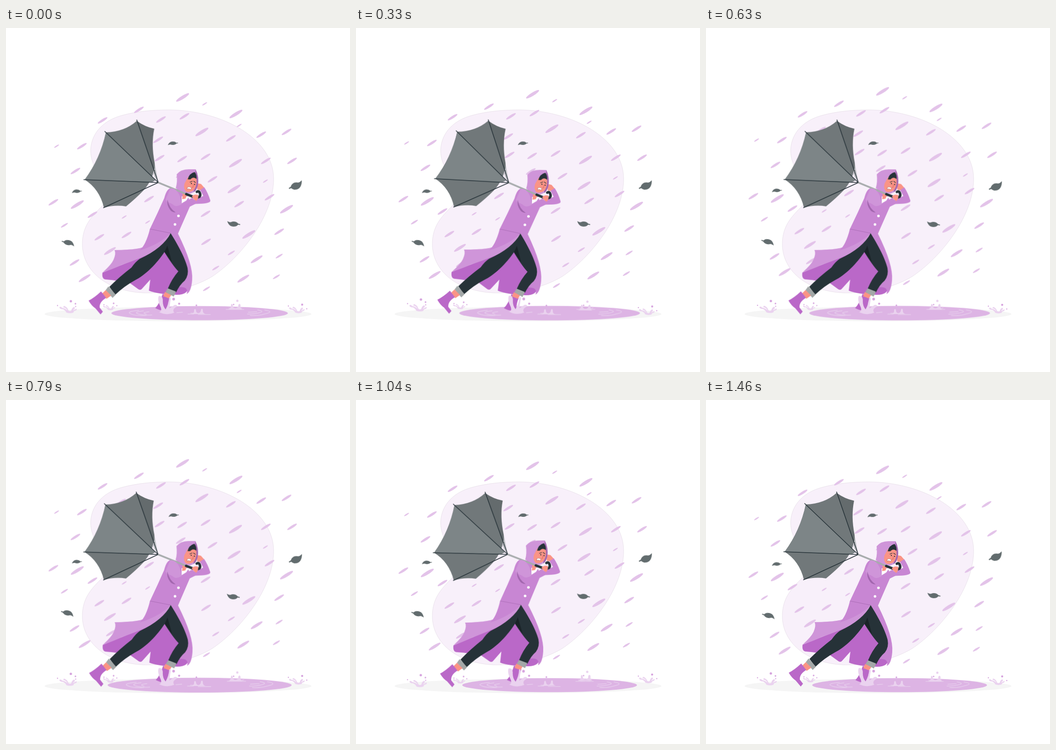
Write an HTML page without scripts that moves like this. It is 748 px wide and 748 px high and loops after 1.5 s.

```html
<!DOCTYPE html>
<html lang="en">
<head>
<meta charset="utf-8">
<title>Walking against the storm</title>
<style>
  html, body { margin: 0; width: 100%; height: 100%; overflow: hidden; background: #fff; }
  svg { display: block; width: 100vw; height: 100vh; }

  .rain, .walker, .splashes { animation: 1.5s linear -40ms infinite; }
  .rain { animation-name: bob; }
  .walker, .splashes { animation-name: sway; }
  .walker { transform-origin: 307px 412px; }
  .splashes { transform-origin: 383px 606px; }
  .leaves { transform-origin: 383px 360px; animation: drift 1.5s linear infinite; }
  .puddle { transform-origin: 421px 620px; animation: swell 1.5s linear infinite; }

  @keyframes bob { 50% { transform: translateY(-15px); } }
  @keyframes sway {
    25% { transform: rotate(1deg); }
    75% { transform: rotate(-1deg); }
  }
  @keyframes drift {
    0%, 22% { transform: rotate(.45deg); }
    42% { transform: rotate(.9deg); }
    52.7% { transform: rotate(1.3deg); }
    69.3% { transform: rotate(.9deg); }
    83.3% { transform: rotate(.45deg); }
    97.3% { transform: rotate(0deg); }
    100% { transform: rotate(.45deg); }
  }
  @keyframes swell {
    0% { transform: scale(1.01); }
    22%, 42% { transform: scale(1.034); }
    52.7% { transform: scale(1.053); }
    69.3%, 97.3% { transform: scale(1); }
    100% { transform: scale(1.01); }
  }

  .rain polyline { fill: none; stroke: transparent; marker: url(#drop); }
  .coat { fill: #c886d3; }
  .fold { fill: #cf95d9; }
  .lining { fill: #ba68c8; }
  .shade { fill: #a266ae; }
  .dark { fill: #263238; }
  .skin { fill: #fa9486; }
  .cuff { fill: #a3a8a8; }
  .white { fill: #fff; }
  .line { fill: none; stroke: #263238; stroke-linecap: round; }
  .foam { fill: #ead2ef; }
  .bead { fill: #d6a4de; }
  .ripple { fill: none; stroke: #e6cbec; stroke-width: 1.7; stroke-linecap: round; }
  .leaves { fill: #626c6e; }
</style>
</head>
<body>
<svg viewBox="0 0 748 748">
  <defs>
    <marker id="drop" overflow="visible" markerWidth="1" markerHeight="1">
      <ellipse rx="1" ry=".22" transform="rotate(-32)" fill="#e3c3e9"/>
    </marker>
    <path id="leaf" d="M-14 5C-11-3-5-6 2-5C6-5 8-3 10-1.500L14-2L14.500-.5L10 .5C6 5-1 5-5 3.500C-9 2.500-11 4-14 5z"/>
    <path id="crown" d="M-8 7Q-9 3-15 0Q-22 0-23-4Q-20-7-17-3Q-10-2-5 3Q-8-3-14-4Q-15-7-12-7Q-6-5-3 3Q0 5 3 3Q4-3 9-5Q12-4 10-1Q7 1 7 3Q12-1 15-1Q15 3 11 3Q7 5 8 7Q0 10-8 7z"/>
  </defs>

  <path d="M355 178C470 179 582 240 582 328C582 410 510 499 449 540C405 567 345 577 300 576C215 572 166 525 166 470C166 430 186 410 209 387C226 366 216 345 203 320C190 300 184 285 184 265C186 225 215 200 252 190C285 181 320 178 355 178z"
    fill="#f8f0fa" stroke="#ddd3e0" stroke-width=".6"/>
  <ellipse cx="374" cy="622" rx="290" ry="15.500" fill="#f5f5f5"/>

  <g class="puddle">
    <ellipse cx="421" cy="620" rx="190" ry="15.300" fill="#ddb4e4"/>
    <path class="ripple" d="M290 614Q260 617 274 622Q284 626 306 625M300 615Q276 618 290 622Q300 625 318 624M312 617Q294 619 306 622M396 622H408M418 623H444M402 620H410M478 612H516M484 609Q500 615 512 609M546 613Q562 616 550 619Q540 622 524 622M561 613Q584 617 560 622Q548 626 530 625M526 618L544 617M372 619L384 618"/>
  </g>

  <g class="rain" transform="translate(0 .8)">
    <polyline stroke-width="16.500" points="384,151 500,187 426,226 499,294 496,350 528,449 610,394 155,384"/>
    <polyline stroke-width="15" points="226,485 545,503 516,545 171,544"/>
    <polyline stroke-width="12.300" points="289,178 210,201 165,257 337,199 388,192 489,240 555,232 610,226 331,243 434,280 334,283 383,285 565,289 622,289 151,311 449,329 573,368 103,379 311,372 188,406 507,383 434,404 435,465 203,455 262,450 594,443 149,510 250,235 380,319 228,520"/>
    <polyline stroke-width="9" points="127,429 594,496 588,541 490,489 456,522 436,567"/>
    <polyline stroke-width="6.300" points="432,165 507,212 110,257 564,333 257,411 308,422"/>
  </g>

  <g class="leaves">
    <use href="#leaf" transform="translate(362 251)scale(.78)"/>
    <use href="#leaf" transform="translate(154 357)scale(.76)"/>
    <use href="#leaf" transform="translate(495.500 425)scale(1 -1.150)"/>
    <use href="#leaf" transform="translate(136 469)rotate(8)scale(-1 1.150)"/>
    <use href="#leaf" transform="translate(630 341)rotate(164)scale(1.120 1.600)"/>
  </g>

  <g class="walker">
    <!-- umbrella -->
    <path fill="#c3c4c8" d="M323 293L331 336L322 322z"/>
    <path fill="#71787a" d="M284 202Q257 226 217 227Q205 284 171 330Q203 350 213 391Q237 384 261 388Q283 370 299 353Q321 328 323 298z"/>
    <path fill="#7d8587" d="M217 227Q205 284 171 330L318 335L325 331z"/>
    <path fill="#646b6d" d="M284 202Q302 215 322 219Q315 253 323 293Q324 314 318 328L324 311z"/>
    <path class="line" stroke-width="1.600" d="M331 336L284 200M331 336L214.500 225M331 336L169 330M331 336L212 391"/>

    <!-- far boot and skirt lining -->
    <path class="lining" d="M210 532Q208 547 218 547Q244 549 270 555L288 568Q293 571 296 567L314 547L311 571Q330 579 372 580Q398 580 397 560L394 500L350 460L290 500z"/>
    <path class="lining" d="M341 578L357 586Q352 597 352 612Q340 617 325 609Q335 598 341 578z"/>
    <path class="skin" d="M346 574L360 580L355 588L342 583z"/>

    <!-- coat -->
    <path class="coat" d="M358 348Q349 350 344 370L330 401L313 437Q310 458 303 474L358 446L395 520L372 564Q399 560 393 578Q403 574 405 548Q408 515 374 447L402 383L390 352z"/>
    <path class="fold" d="M302 473Q299 482 236 483Q240 490 234 504Q229 515 211 531Q234 524 252 515Q320 492 338 474Q350 460 358 446Q330 464 302 473z"/>
    <path class="coat" d="M313 437L358 446Q335 470 290 484Q304 473 313 437z"/>
    <path fill="none" stroke="#a266ae" stroke-width=".8" d="M313 437L358 446"/>

    <!-- legs -->
    <path class="dark" d="M358 446C372 468 390 500 395 522Q398 537 389 549Q378 558 370 575L352 567Q361 545 375 529Q363 517 342 483z"/>
    <path fill="#1a2327" d="M342 483L350 470L361 509z"/>
    <path class="dark" d="M358 446Q354 470 344 488C328 512 304 537 280 549Q258 561 238 580L225 563Q247 541 273 521Q282 508 291 502Q342 478 358 446z"/>
    <path class="cuff" d="M223 562L239 580L232 587L217 570zM352 566L370 573L365 584L347 574z"/>
    <path class="skin" d="M217 570L229 582L219 589L209 578z"/>
    <path class="lining" d="M207 573L218 587Q203 596 204 608L211 617L206 623L195 610Q186 604 180 593Q192 587 207 573z"/>

    <!-- raised arm -->
    <path class="skin" d="M414 337L424 339L431 347L424 353L416 351z"/>
    <path class="coat" d="M399 383L420 382Q447 381 444 374Q439 358 431 346L422 352L429 365L408 374z"/>

    <!-- neck and shirt -->
    <path class="white" d="M382 366L398 366L392 375L382 381z"/>
    <path class="skin" d="M385 352L395 360L390 371L383 372z"/>

    <!-- hood and face -->
    <path class="fold" d="M371 318Q380 307 397 307L412 307Q420 323 417 342Q413 357 400 360L386 357L369 348Q373 335 371 318z"/>
    <path class="shade" d="M412 307Q420 323 417 342Q414 354 408 357L411 325z"/>
    <path class="skin" d="M395 325L388 338Q385 350 392 356Q404 358 410 350Q417 338 413 322L402 320z"/>
    <path class="dark" d="M395 329Q398 316 410 313Q415 319 414 328Q407 322 401 329z"/>
    <path class="line" stroke-width="1.200" d="M400 335L405 333M408 333L412 336"/>
    <g class="dark">
      <circle cx="403" cy="338" r="1.200"/>
      <circle cx="410" cy="340" r="1.200"/>
    </g>
    <path fill="none" stroke="#d9645f" stroke-width="1" d="M407 339L407 346L404 346"/>
    <path class="white" d="M394 346.500Q398 344 403 347L402 351Q396 348 394 351z" stroke="#7c3f3f" stroke-width=".5"/>

    <!-- handle -->
    <path fill="none" stroke="#a8acad" stroke-width="3.800" d="M331 336L392 361"/>
    <path class="line" stroke-width="5.500" d="M392 361L410 368Q424 370 422 360Q420 353 415 356"/>

    <!-- near arm -->
    <path class="fold" d="M357 349Q370 347 378 365L382 382L405 369L416 380L374 401Q366 404 360 397L347 373z"/>
    <path class="coat" d="M362 383Q368 390 378 385L405 369L416 380L374 401Q366 404 360 397L351 378z"/>
    <path class="shade" d="M351 373Q355 392 369 401Q360 401 356 394Q349 384 351 373z"/>
    <path class="skin" d="M404 366Q410 360 418 363Q419 370 414 376Q408 373 404 366z"/>
    <g class="white">
      <circle cx="375" cy="408.500" r="2.800"/>
      <circle cx="367.500" cy="427" r="2.800"/>
    </g>
  </g>

  <g class="splashes">
    <g class="foam">
      <use href="#crown" transform="translate(139 612)"/>
      <use href="#crown" transform="translate(227 608)scale(.7)"/>
      <use href="#crown" transform="translate(636 612)scale(.9)"/>
      <path d="M332 583Q340 581 341 591Q340 604 347 612Q354 600 355 586Q358 583 358 590L355 610L367 602Q374 602 371 606Q360 612 366 619Q350 626 333 618Q341 615 335 604Q329 592 332 583z"/>
      <path d="M403 622Q410 620 409 613Q411 609 413 613Q413 619 418 620Q424 619 424 612Q427 608 428 613Q427 620 434 622z"/>
      <path d="M482 612Q490 610 489 602Q491 597 493 602Q493 609 499 609Q506 608 505 602Q508 597 510 602Q509 610 514 612z"/>
      <circle cx="503" cy="593" r="2.500"/>
    </g>
    <g class="bead">
      <circle cx="112" cy="604" r="1.300"/>
      <circle cx="141" cy="594.500" r="2.600"/>
      <circle cx="151" cy="600" r="1.800"/>
      <circle cx="151.500" cy="606" r="1.200"/>
      <circle cx="213" cy="602" r="1.200"/>
      <circle cx="234" cy="599" r="1.800"/>
      <circle cx="241" cy="604" r="1.200"/>
      <circle cx="364.500" cy="589.500" r="2.900"/>
      <circle cx="376.500" cy="599.500" r="2.300"/>
      <circle cx="414" cy="603" r="1.800"/>
      <circle cx="495" cy="601" r="1.600"/>
      <circle cx="614" cy="604" r="1.300"/>
      <circle cx="644" cy="601" r="2.300"/>
      <circle cx="654" cy="610" r="1.300"/>
    </g>
  </g>
</svg>
</body>
</html>
```
